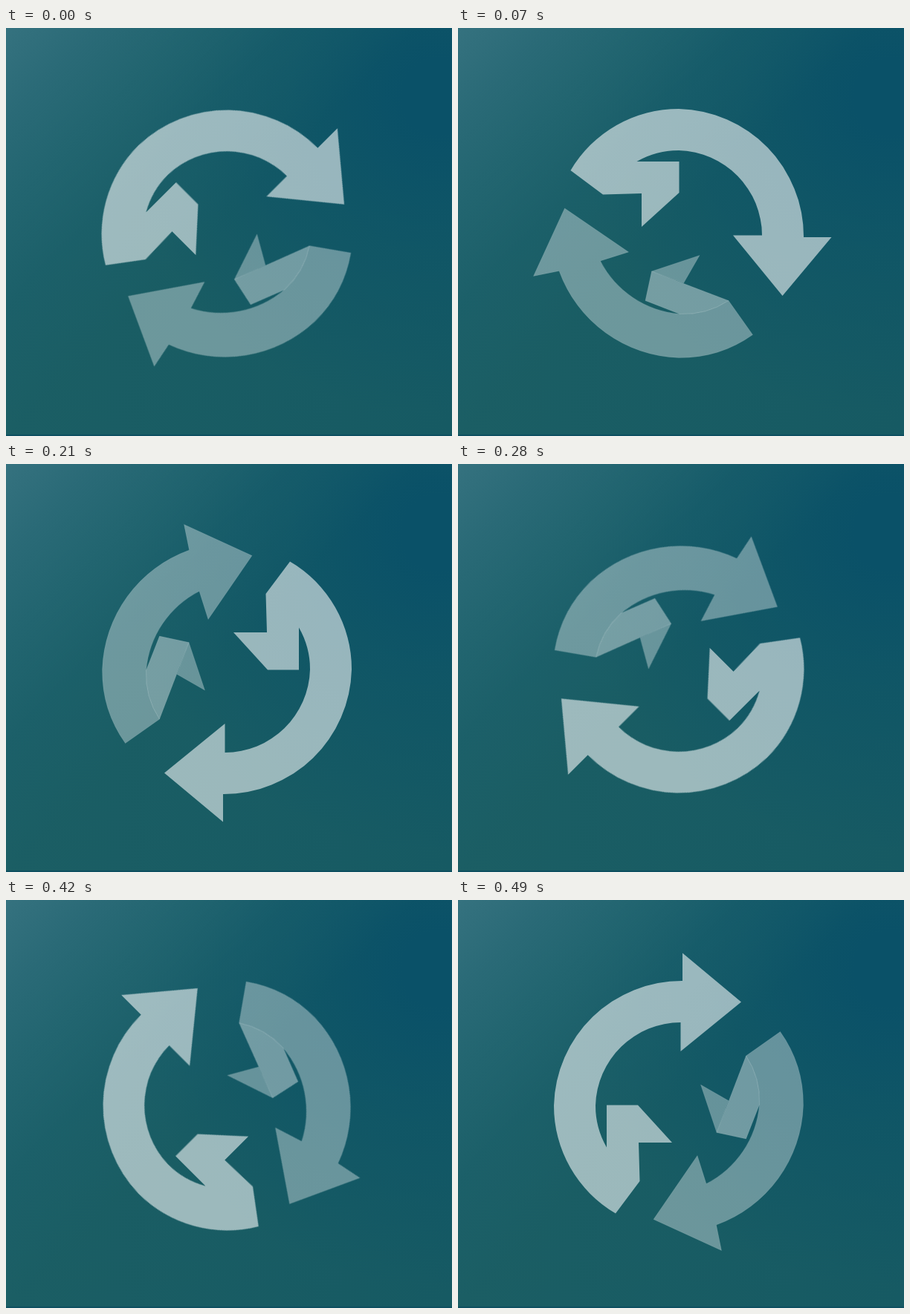
Write an HTML page that moves like this. It is 600 by 550 pixels and loops after 560 ms.

```html
<!DOCTYPE html>
<html lang="en">
<head>
<meta charset="utf-8">
<title>Rotating arrows</title>
<style>
  html, body { margin: 0; width: 100%; height: 100%; overflow: hidden; }
  body {
    background:
      linear-gradient(#0d4f60, #0d4f60) 0 100% / 100% 2px no-repeat,
      linear-gradient(135deg, #35727f 0%, #2b6b78ee 11%, #246773cc 21%, #1d627066 33%, #185d6a00 48%),
      radial-gradient(circle at 97% 17%, #0a5168 0 50px, #0d5467bb 190px, #195b6300 430px),
      linear-gradient(90deg, #1b5e64, #165a63);
  }
  svg { display: block; width: 600px; height: 550px; fill: #fff; }
  #arrows {
    transform-origin: 297px 277px;
    animation: turn 560ms steps(8, end) infinite;
  }
  .dim { stroke: #fff; stroke-opacity: .1; stroke-width: 1; }
  @keyframes turn {
    from { transform: rotate(45deg); }
    to { transform: rotate(405deg); }
  }
</style>
</head>
<body>
<svg viewBox="0 0 600 550">
  <g id="arrows">
    <!-- Bright arrow with its folded tail -->
    <path fill-opacity=".57" d="M381 137.5 302 71.5V109A172 172 0 0 0 129 277A168 168 0 0 0 212 422.5
      L244.5 379 243 327H288L242 276.5H200V333.5A112.5 112.5 0 0 1 185 277A115 115 0 0 1 299.5 165V204Z"/>
    <!-- Dim arrow: band, folded tail, tail tip -->
    <g class="dim">
      <path fill-opacity=".36" d="M433.5 177.5A168 168 0 0 1 464.5 277A177 177 0 0 1 347.5 438L354.5 472.5
        263 430.5 322 344.5 334 382.5A132 132 0 0 0 405.5 276A110 110 0 0 0 387.5 210Z"/>
      <path fill-opacity=".4" d="M387.5 210A110 110 0 0 1 405.5 276L387.5 322 348 313.5Z"/>
      <path fill-opacity=".35" d="M326.5 249 364 270.5 348 313.5Z"/>
    </g>
  </g>
</svg>
</body>
</html>
```
